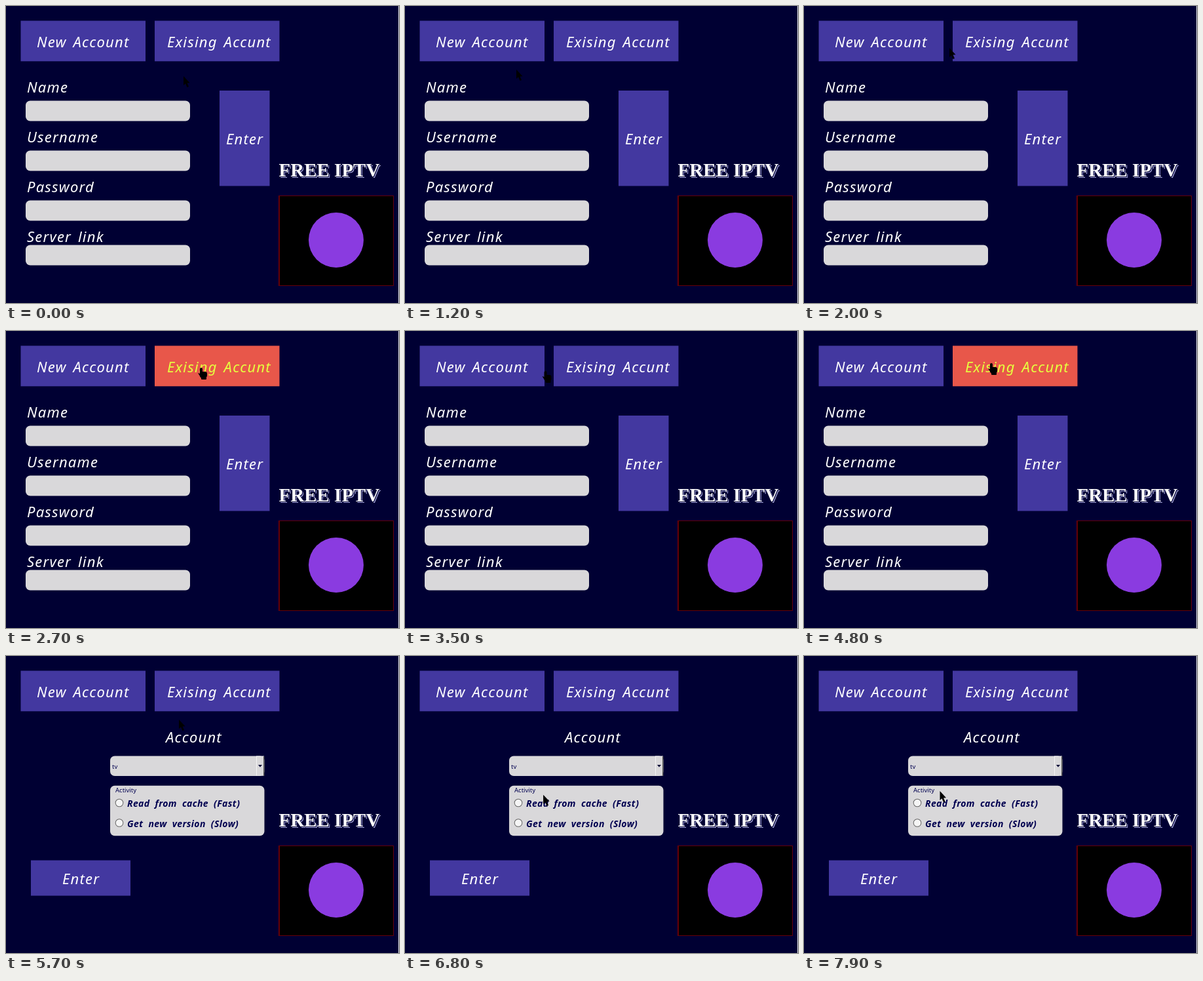
An HTML page with a canvas that plays this animation: 600 px wide and 453 px high, repeating every 8 s.

```html
<!DOCTYPE html>
<html lang="en">
<head>
<meta charset="utf-8">
<title>Account form</title>
<style>
  html, body { margin: 0; width: 100%; height: 100%; overflow: hidden; background: #000033; }
  canvas { display: block; width: 600px; height: 453px; }
</style>
</head>
<body>
<canvas id="stage" width="600" height="453"></canvas>
<script>
const ctx = document.getElementById('stage').getContext('2d');
const LOOP = 8000;
const TICK = 100;
const PAGE_SWITCH = 4900;
const NAVY = '#000033', INDIGO = '#4338a0', GREY = '#d9d8da', INK = '#000050';

const fonts = {
  hand: { font: 'italic 22px "Noto Sans", sans-serif', letter: 1.2, word: 3 },
  option: { font: 'italic bold 14px "Noto Sans", sans-serif', letter: 0.4, word: 4 },
  small: { font: '9.5px "Noto Sans", sans-serif', letter: 0, word: 0 },
  title: { font: 'bold 29px "Liberation Serif", serif', letter: 0, word: 0 }
};

const tabs = [
  { x: 22.5, y: 22.5, w: 190.5, h: 61.8, label: 'New Account', textX: 47 },
  { x: 227, y: 22.5, w: 190.5, h: 61.8, label: 'Exising Accunt', textX: 246 }
];

// The pointer rests at each stop until the next move begins.
const home = { x: 271, y: 107 };
const moves = [
  { from: 0, to: 400, x: 140, y: 58 },
  { from: 400, to: 1200, x: 170, y: 97 },
  { from: 1800, to: 2000, x: 222, y: 64 },
  { from: 2100, to: 2700, x: 298, y: 56 },
  { from: 3100, to: 3500, x: 214.5, y: 61 },
  { from: 3500, to: 3700, x: 160, y: 59 },
  { from: 4100, to: 4200, x: 220, y: 60 },
  { from: 4600, to: 4800, x: 286, y: 49 },
  { from: 5500, to: 5700, x: 264, y: 97 },
  { from: 5800, to: 7200, x: 198, y: 240 },
  { from: 7600, to: 7900, x: 207.5, y: 206 }
];

function ease(u) {
  const v = Math.min(1, Math.max(0, u));
  return v * v * (3 - 2 * v);
}

function pointerAt(time) {
  return moves.reduce((p, move) => {
    const s = ease((time - move.from) / (move.to - move.from));
    return { x: p.x + (move.x - p.x) * s, y: p.y + (move.y - p.y) * s };
  }, home);
}

function rect(x, y, w, h, color) {
  ctx.fillStyle = color;
  ctx.fillRect(x, y, w, h);
}

function rounded(x, y, w, h) {
  ctx.fillStyle = GREY;
  ctx.beginPath();
  ctx.roundRect(x, y, w, h, 7);
  ctx.fill();
}

function circle(x, y, r, color) {
  ctx.fillStyle = color;
  ctx.beginPath();
  ctx.arc(x, y, r, 0, 2 * Math.PI);
  ctx.fill();
}

function polygon(points, color) {
  ctx.fillStyle = color;
  ctx.beginPath();
  points.forEach(([x, y]) => ctx.lineTo(x, y));
  ctx.fill();
}

function text(label, x, y, color = '#fff', style = fonts.hand) {
  ctx.font = style.font;
  ctx.letterSpacing = style.letter + 'px';
  ctx.wordSpacing = style.word + 'px';
  ctx.fillStyle = color;
  ctx.fillText(label, x, y);
}

function isOver(box, { x, y }, margin = 0) {
  return x >= box.x - margin && x <= box.x + box.w + margin &&
         y >= box.y - margin && y <= box.y + box.h + margin;
}

function drawTab(tab, hovered) {
  rect(tab.x, tab.y, tab.w, tab.h, hovered ? '#e8574a' : INDIGO);
  text(tab.label, tab.textX, 63, hovered ? '#e6ff3f' : '#fff');
}

function drawNewAccount() {
  ['Name', 'Username', 'Password', 'Server link'].forEach((label, i, all) => {
    const isLast = i === all.length - 1;
    text(label, 32, 132 + 76 * i);
    rounded(30, 144.5 + 76 * i - (isLast ? 8 : 0), 251, 31);
  });
  rect(326, 129, 76.5, 145.5, INDIGO);
  text('Enter', 336, 211);
}

function drawOption(label, y) {
  circle(173, y, 6.3, '#666');
  circle(173, y, 5.3, '#f5f5f5');
  text(label, 185, y + 6, INK, fonts.option);
}

function drawExistingAccount() {
  text('Account', 244, 132);

  rounded(159, 152.5, 235.5, 30.5);
  text('tv', 162, 172, INK, fonts.small);
  rect(382, 152.5, 12, 30, '#f4f4f4');
  rect(383, 153.5, 11, 29, GREY);
  rect(393, 153, 1.5, 30, '#555');
  polygon([[385, 166], [391, 166], [388, 169.5]], NAVY);

  rounded(159, 197.7, 235.5, 76.5);
  text('Activity', 167, 207.5, INK, fonts.small);
  drawOption('Read from cache (Fast)', 224);
  drawOption('Get new version (Slow)', 254.5);

  rect(38, 311.6, 152, 54, INDIGO);
  text('Enter', 86, 348);
}

function drawBanner() {
  ['#a9a9dd', NAVY, '#fff'].forEach((color, layer) => {
    text('FREE IPTV', 418.5 - layer, 261.8 - layer, color, fonts.title);
  });
  rect(416, 289, 176, 138, '#650008');
  rect(418, 290, 173, 136, '#000');
  circle(504, 357, 42, '#8a3be0');
}

function drawPointer({ x, y }, hand) {
  ctx.save();
  ctx.translate(x, y);
  if (hand) {
    ctx.fillStyle = '#000';
    ctx.beginPath();
    ctx.roundRect(-2, 0, 4, 13, 2);
    ctx.roundRect(-2, 6, 11, 9, 3);
    ctx.roundRect(0, 12, 8, 6, 1);
    ctx.fill();
    polygon([[-5, 8], [-2, 9], [2, 16], [0, 16]], '#000');
  } else {
    polygon([[0, 0], [0, 14], [3, 11.3], [5.5, 17], [8, 16], [5.5, 10.5], [9.5, 10.2]], '#000');
  }
  ctx.restore();
}

function draw(time) {
  const pointer = pointerAt(Math.floor(time / TICK) * TICK);
  rect(0, 0, 600, 453, NAVY);
  rect(599, 0, 1, 453, '#d8d8e0');
  tabs.forEach(tab => drawTab(tab, isOver(tab, pointer)));
  if (time < PAGE_SWITCH) drawNewAccount();
  else drawExistingAccount();
  drawBanner();
  drawPointer(pointer, tabs.some(tab => isOver(tab, pointer, 3)));
}

const start = performance.now();
function tick() {
  draw((performance.now() - start) % LOOP);
  requestAnimationFrame(tick);
}
tick();
</script>
</body>
</html>
```
